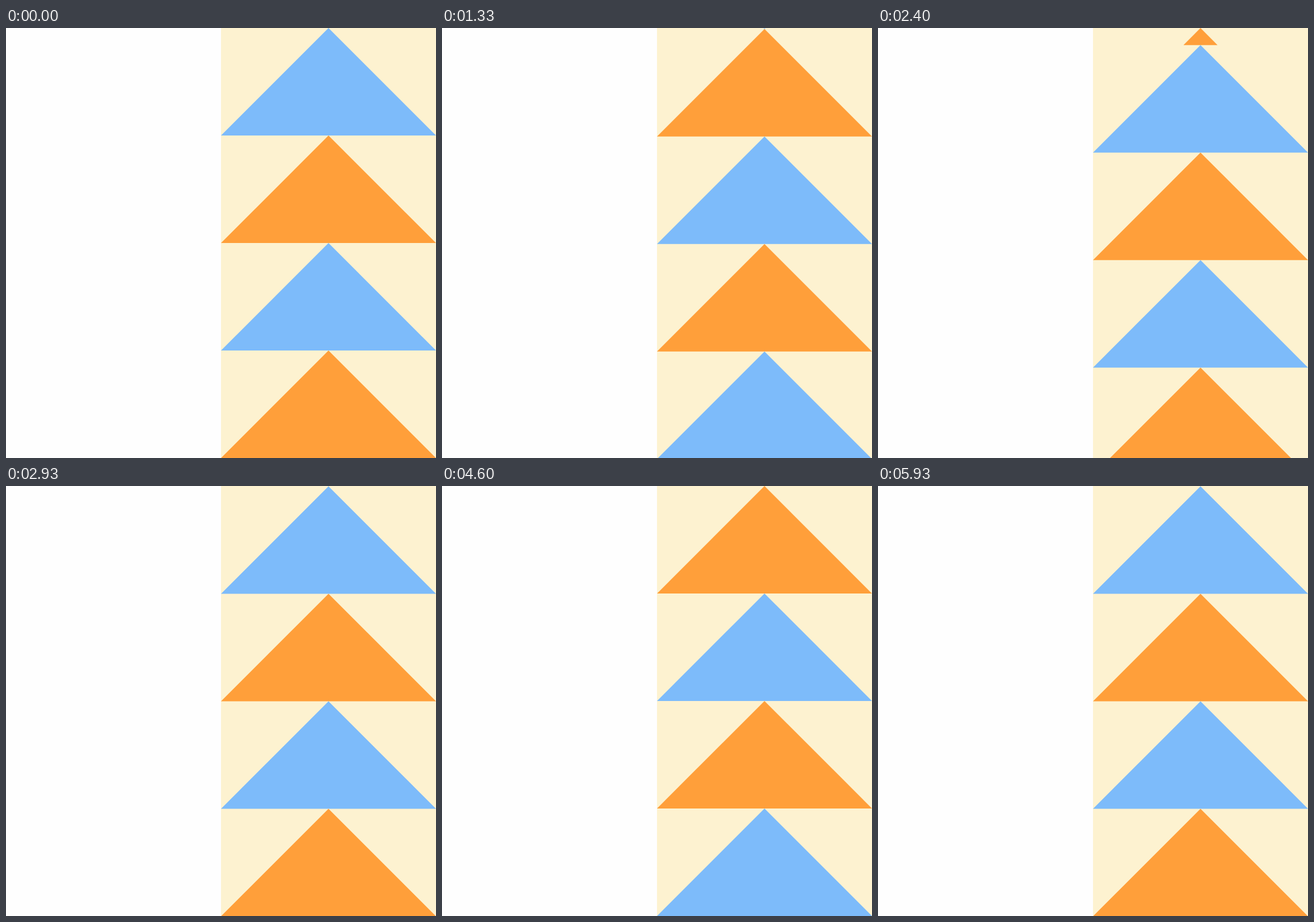
An HTML page for the animation above (5.99 s loop, 748 by 748 pixels).

```html
<!DOCTYPE html>
<html lang="en">
<head>
<meta charset="utf-8">
<title>Triangle stack</title>
<style>
  html, body { margin: 0; width: 100%; height: 100%; overflow: hidden; background: #fefefe; }
  svg { display: block; width: 100vw; height: 100vh; }
</style>
</head>
<body>
<svg viewBox="0 0 748 748">
  <rect x="374" width="374" height="748" fill="#fdf2d0"/>
  <g id="stack"></g>
</svg>
<script>
const LOOP = 5990, CYCLE = 1500, DELAY = 44;
const SIZE = 187, CENTER = 561, COUNT = 5;
const COLORS = ['#7dbbfa', '#ff9f3a'];

const stack = document.getElementById('stack');
const triangles = Array.from({ length: COUNT }, () =>
  stack.appendChild(document.createElementNS('http://www.w3.org/2000/svg', 'polygon')));

// cubic-bezier(.86, 0, .07, 1), solved by bisection
function ease(x) {
  let lo = 0, hi = 1;
  for (let i = 0; i < 30; i++) {
    const u = (lo + hi) / 2, v = 1 - u;
    const bx = 3 * v * v * u * 0.86 + 3 * v * u * u * 0.07 + u ** 3;
    if (bx < x) lo = u; else hi = u;
  }
  return lo * lo * (3 - 2 * lo);
}

// Poses alternate between 130 ms and 70 ms holds
function hold(t) {
  const r = t % 200;
  return t - r + (r < 130 ? 0 : 130);
}

function place(triangle, apex, height, color) {
  const base = apex + height;
  triangle.setAttribute('points',
    `${CENTER},${apex} ${CENTER + height},${base} ${CENTER - height},${base}`);
  triangle.setAttribute('fill', color);
}

function render(ms) {
  const t = hold(ms % LOOP) - DELAY;
  const cycle = Math.floor(t / CYCLE);
  const top = SIZE * (1 - ease(t / CYCLE - cycle));
  triangles.forEach((triangle, i) => {
    const color = COLORS[(cycle + i + 2) % 2];
    if (i === 0) place(triangle, 0, top, color);
    else place(triangle, top + (i - 1) * SIZE, SIZE, color);
  });
}

const start = performance.now();
function tick() {
  render(performance.now() - start);
  requestAnimationFrame(tick);
}
tick();
</script>
</body>
</html>
```
